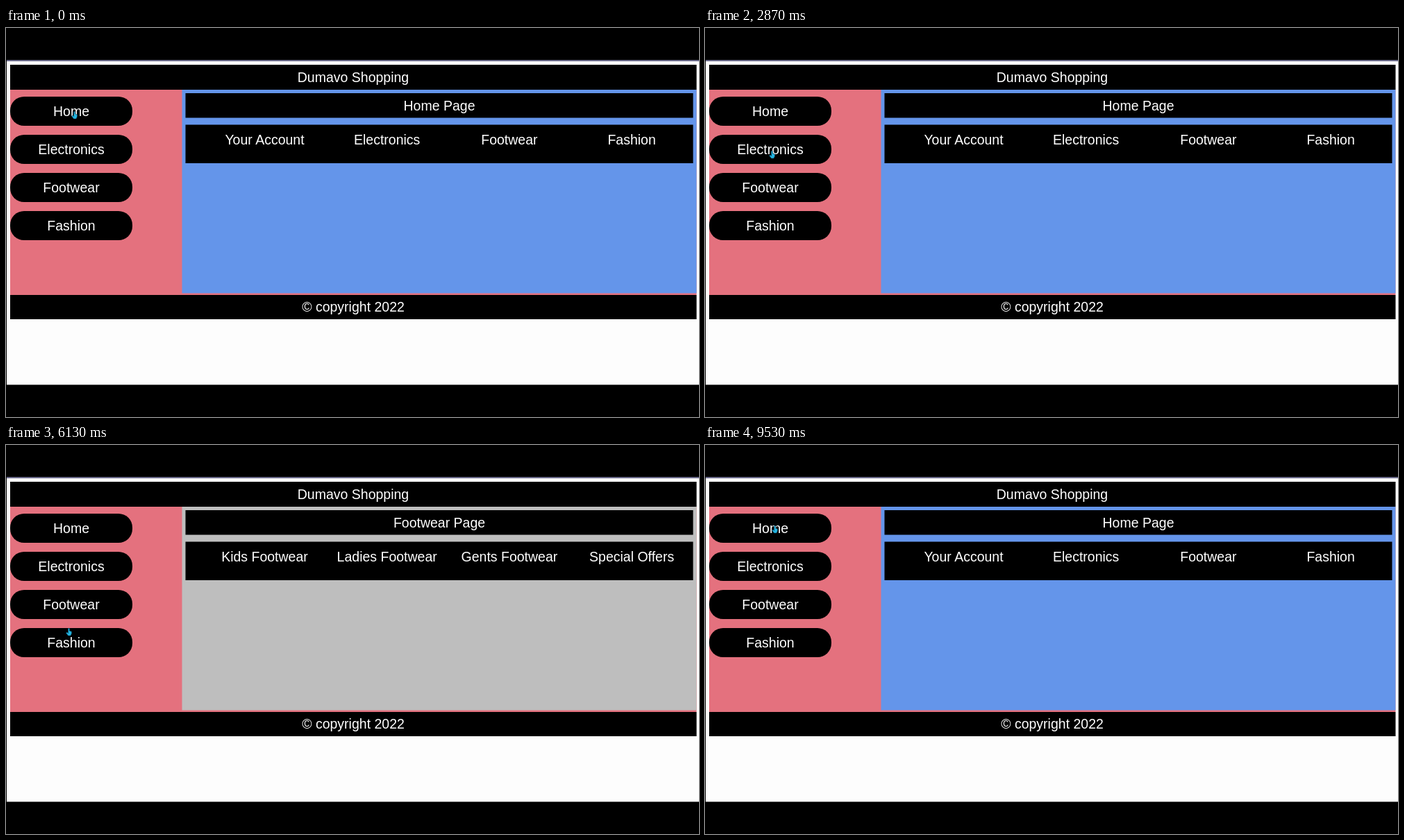
Animation, 998 px wide and 561 px high, one loop 9560 ms. Source, as an HTML page:

```html
<!DOCTYPE html>
<html lang="en">
<head>
<meta charset="utf-8">
<title>Shop pages</title>
<style>
  html, body { margin: 0; width: 100%; height: 100%; overflow: hidden; background: #000; }
  svg { display: block; width: 100%; height: 100%; }
  text { font: 19.5px "Liberation Sans", Arial, sans-serif; fill: #fff; text-anchor: middle; }
</style>
</head>
<body>
<svg id="stage" viewBox="0 0 998 561">
  <rect width="998" height="561"/>
  <rect x="1" y="46" width="997" height="468.5" fill="#fdfdfd"/>
  <rect x="1" y="46" width="997" height="2" fill="#6c6c8c"/>
  <rect x="6" y="89" width="988.5" height="296" fill="#e4717e"/>
  <rect x="6" y="53" width="988.5" height="36"/>
  <rect x="6" y="385" width="988.5" height="35"/>
  <text x="500" y="78">Dumavo Shopping</text>
  <text x="500" y="409">© copyright 2022</text>
  <g id="menu"></g>
  <g id="page">
    <rect id="panel" x="253.5" y="89" width="741" height="293.5"/>
    <rect x="258.5" y="94" width="731" height="35.5"/>
    <rect x="258.5" y="139.5" width="731" height="55.5"/>
    <text id="title" x="624" y="118.5"/>
    <g id="links"></g>
  </g>
  <g id="cursor">
    <path id="hand" d="M-1.5-5.5h2v3.5l3 1v3l-1.5 3h-3.5l-3-4 1.5-1 1.5 1.5z" fill="#22b4e0" stroke="#0b3b50" stroke-width=".5"/>
    <path id="arrow" d="M-1-5v7l1.6-1.4 1.4 3 1-.5-1.3-2.8h1.7z" fill="#2c9aa6" stroke="#123a42" stroke-width=".5"/>
  </g>
</svg>
<script>
const LOOP = 9560;
const $ = id => document.getElementById(id);

function add(parent, tag, attrs, label = '') {
  const el = document.createElementNS('http://www.w3.org/2000/svg', tag);
  for (const key in attrs) el.setAttribute(key, attrs[key]);
  el.textContent = label;
  return parent.appendChild(el);
}

['Home', 'Electronics', 'Footwear', 'Fashion'].forEach((name, i) => {
  const y = 99 + i * 55;
  add($('menu'), 'rect', { x: 6, y, width: 176, height: 42, rx: 20 });
  add($('menu'), 'text', { x: 94, y: y + 28 }, name);
});
const links = [0, 1, 2, 3].map(i =>
  add($('links'), 'text', { x: 372.5 + i * 176.2, y: 167.5 }));

const pages = {
  Home: ['#6495ea', 'Your Account', 'Electronics', 'Footwear', 'Fashion'],
  Electronics: ['#9acd32', 'Mobiles', 'Laptops', 'Televisions', 'Special Offers'],
  Footwear: ['#bebebe', 'Kids Footwear', 'Ladies Footwear', 'Gents Footwear', 'Special Offers'],
  Fashion: ['#f5a503', 'Kids Section', 'Ladies Section', 'Gents Section', 'Special Offers']
};

// Start time and page; each click leaves the panel empty for a moment.
const visits = [[-1000, 'Home'], [3080, 'Electronics'], [4880, 'Footwear'], [6950, 'Fashion'], [8850, 'Home']];
const BLANK = 110;

// Time, x, y of the pointer.
const path = [
  [0, 99, 126], [1700, 99, 126], [2400, 97, 183], [4000, 97, 183],
  [4650, 103, 237], [5650, 103, 237], [6130, 91, 270], [6500, 94, 291],
  [7550, 94, 291], [8330, 109, 119], [8750, 101, 122], [LOOP, 101, 122]
];

function pointerAt(t) {
  const i = path.findIndex(p => p[0] > t);
  const [t0, x0, y0] = path[i - 1], [t1, x1, y1] = path[i];
  const u = (t - t0) / (t1 - t0), k = u * u * (3 - 2 * u);
  return [x0 + (x1 - x0) * k, y0 + (y1 - y0) * k];
}

let shown = '';
function showPage(name) {
  if (name === shown) return;
  shown = name;
  const [color, ...labels] = pages[name];
  $('panel').setAttribute('fill', color);
  $('title').textContent = name + ' Page';
  links.forEach((link, i) => { link.textContent = labels[i]; });
}

const toggle = (id, on) => $(id).setAttribute('visibility', on ? 'visible' : 'hidden');

function draw(t) {
  const [start, name] = visits.filter(v => v[0] <= t).pop();
  showPage(name);
  toggle('page', t - start >= BLANK);

  const [x, y] = pointerAt(t);
  const row = (y - 99) % 55;
  const onButton = row > 6 && row < 42;
  $('cursor').setAttribute('transform', `translate(${x} ${y})`);
  toggle('hand', onButton);
  toggle('arrow', !onButton);
}

const begin = performance.now();
function tick() {
  draw((performance.now() - begin) % LOOP);
  requestAnimationFrame(tick);
}
tick();
</script>
</body>
</html>
```
